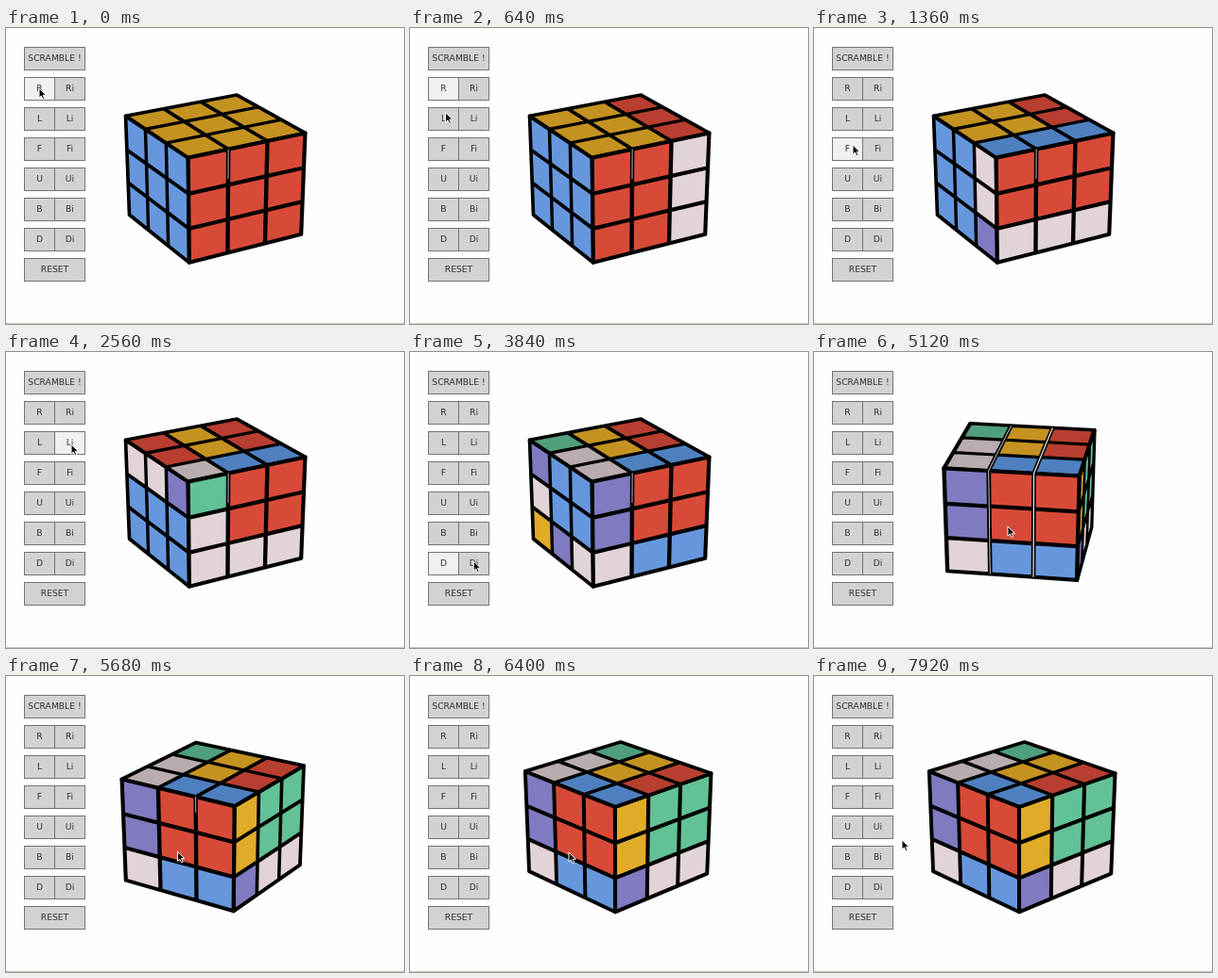
An HTML page with a canvas that plays this animation: 421x314 px, repeating every 8000 ms.

```html
<!DOCTYPE html>
<html lang="en">
<head>
<meta charset="utf-8">
<title>Cube simulator</title>
<style>
  html, body { margin: 0; width: 421px; height: 314px; overflow: hidden; background: #fefefe; }
  body { position: relative; }
  canvas, svg { position: absolute; left: 0; top: 0; }
  .btn {
    position: absolute; box-sizing: border-box; height: 25px;
    border: 1px solid #747474; background: #d2d2d2; color: #333;
    font: 9.2px/22px "DejaVu Sans", sans-serif; text-align: center; white-space: nowrap;
  }
  .btn.hot { background: #f0f0f0; }
  .rule { position: absolute; left: 0; top: 313px; width: 421px; height: 1px; background: #c6c6c6; }
</style>
</head>
<body>
<canvas id="stage" width="421" height="314"></canvas>
<div class="rule"></div>
<svg id="cursor" width="12" height="16" viewBox="-1 -1 12 16">
  <path d="M0 0V10.2L2.4 8 4 11.6 5.8 10.8 4.2 7.3H7.4Z" fill="#000" stroke="#fff" stroke-width="1"/>
</svg>
<script>
const LOOP = 8000;
const ctx = document.getElementById('stage').getContext('2d');
const cursor = document.getElementById('cursor');

// Buttons
const buttons = [];
function addButton(label, x, y, w) {
  const el = document.createElement('div');
  el.className = 'btn';
  el.textContent = label;
  el.style.cssText = `left:${x}px;top:${y}px;width:${w}px`;
  document.body.insertBefore(el, cursor);
  buttons.push({ el, x, y, w });
}
addButton('SCRAMBLE !', 19, 20, 65);
[...'RLFUBD'].forEach((name, i) => {
  addButton(name, 19, 52 + i * 32, 33);
  addButton(name + 'i', 51, 52 + i * 32, 33);
});
addButton('RESET', 19, 244, 65);

// Pointer path: time, x, y
const path = [
  [0, 35, 64], [400, 35, 64], [960, 41, 124], [1480, 41, 124],
  [2160, 69, 98], [2900, 69, 98], [3440, 37, 221], [3700, 37, 221],
  [3840, 67, 222], [4480, 243, 184], [4700, 243, 184], [5120, 205, 185],
  [6000, 168, 187], [6720, 168, 187], [7520, 93, 174], [LOOP, 93, 174]
];
const DRAG = [4700, 6000];

function pointerAt(t) {
  t = Math.max(0, t);
  const i = Math.max(1, path.findIndex(p => p[0] > t));
  const [t0, x0, y0] = path[i - 1], [t1, x1, y1] = path[i];
  const k = (t - t0) / (t1 - t0);
  return [x0 + (x1 - x0) * k, y0 + (y1 - y0) * k];
}

// Visible stickers after each turn, row by row
const turns = [
  { at: 0,    U: 'yyyyyyyyy', F: 'rrrrrrrrr', L: 'bbbbbbbbb', R: 'ggggggggg' },
  { at: 240,  U: 'yyryyryyr', F: 'rrwrrwrrw', L: 'bbbbbbbbb', R: 'ggggggggg' },
  { at: 1120, U: 'yyryyrbbb', F: 'rrrrrrwww', L: 'bbwbbwbbp', R: 'yggyggrgg' },
  { at: 2320, U: 'ryrryrwbb', F: 'grrwrrwww', L: 'wwpbbbbbb', R: 'yggyggrgg' },
  { at: 2800, U: 'gyrwyrwbb', F: 'prrprrpww', L: 'pbbwbbwbb', R: 'yggyggrgg' },
  { at: 3600, U: 'gyrwyrwbb', F: 'prrprrwbb', L: 'pbbwbbypw', R: 'yggyggpww' }
];
const sideInk = { y: '#dfab29', r: '#d84a38', b: '#6697dd', g: '#63c196', w: '#e2d3d6', p: '#807ac0' };
const topInk = { y: '#c49220', r: '#b83e30', b: '#4e80c0', g: '#509f7c', w: '#b9acac', p: '#6a64a2' };
const faces = {
  U: { o: [-1, 1, -1], r: [1, 0, 0],  d: [0, 0, 1] },
  F: { o: [-1, 1, 1],  r: [1, 0, 0],  d: [0, -1, 0] },
  L: { o: [-1, 1, -1], r: [0, 0, 1],  d: [0, -1, 0] },
  R: { o: [1, 1, 1],   r: [0, 0, -1], d: [0, -1, 0] }
};

// Camera
const rad = Math.PI / 180;
const PITCH = 26.2 * rad, DIST = 20, FX = 1360, FY = 1182, CX = 220, CY = 156.5;
const sp = Math.sin(PITCH), cp = Math.cos(PITCH);

function project([x, y, z], yaw) {
  const c = Math.cos(yaw * rad), s = Math.sin(yaw * rad);
  const u = x * c + z * s, w = z * c - x * s;
  const depth = DIST - (y * sp + w * cp);
  return [CX + FX * u / depth, CY - FY * (y * cp - w * sp) / depth];
}

function onFace(f, i, j, yaw) {
  const p = f.o.map((v, n) => v + (f.r[n] * i + f.d[n] * j) * 2 / 3);
  return project(p, yaw);
}

// Square patch of a face, measured in sticker cells
function patch(f, i, j, size, yaw) {
  const pts = [[0, 0], [1, 0], [1, 1], [0, 1]]
    .map(([a, b]) => onFace(f, i + a * size, j + b * size, yaw));
  ctx.beginPath();
  for (const p of pts) ctx.lineTo(...p);
  ctx.closePath();
  return pts;
}

function drawFace(name, stickers, yaw) {
  const f = faces[name], ink = name === 'U' ? topInk : sideInk, inset = 0.025;
  const [a, b, c] = patch(f, 0, 0, 3, yaw);
  const area = (b[0] - a[0]) * (c[1] - a[1]) - (b[1] - a[1]) * (c[0] - a[0]);
  if (area <= 0) return;
  ctx.fillStyle = ctx.strokeStyle = '#000';
  ctx.lineJoin = 'round';
  ctx.lineWidth = 4;
  ctx.fill();
  ctx.stroke();
  ctx.lineWidth = 2.4;
  for (let n = 0; n < 9; n++) {
    const i = n % 3, j = (n - i) / 3;
    patch(f, i + inset, j + inset, 1 - 2 * inset, yaw);
    ctx.fillStyle = ink[stickers[n]];
    ctx.fill();
    ctx.stroke();
  }
}

// Light showing between the upright slices
function drawSlits(yaw) {
  ctx.strokeStyle = '#e4e4e4';
  for (const k of [-1, 1]) {
    const w = 1.4 - Math.abs(yaw + 5 * k) / 26;
    if (w < 0.3) continue;
    const i = k < 0 ? 1 : 2, len = Math.min(1, w * w * 1.4);
    ctx.lineWidth = Math.max(0.8, w);
    ctx.beginPath();
    ctx.moveTo(...onFace(faces.F, i, 0, yaw));
    ctx.lineTo(...onFace(faces.F, i, 3 * len, yaw));
    if (len > 0.7) {
      ctx.moveTo(...onFace(faces.U, i, 0, yaw));
      ctx.lineTo(...onFace(faces.U, i, 3, yaw));
    }
    ctx.stroke();
  }
}

function draw(t) {
  const [px, py] = pointerAt(t);
  cursor.style.transform = `translate(${px - 1}px,${py - 1}px)`;

  // Highlight trails the pointer slightly
  const [hx, hy] = pointerAt(t - 120);
  for (const b of buttons)
    b.el.classList.toggle('hot', hx >= b.x && hx < b.x + b.w - 1 && hy >= b.y && hy < b.y + 25);

  const dragX = pointerAt(Math.min(DRAG[1], Math.max(DRAG[0], t)))[0];
  const yaw = 29.8 - (243 - dragX) * 1.02;
  const state = turns.filter(s => s.at <= t).pop();

  ctx.clearRect(0, 0, 421, 314);
  for (const name of 'LRUF') drawFace(name, state[name], yaw);
  drawSlits(yaw);
}

const start = performance.now();
function tick() {
  draw((performance.now() - start) % LOOP);
  requestAnimationFrame(tick);
}
tick();
</script>
</body>
</html>
```
